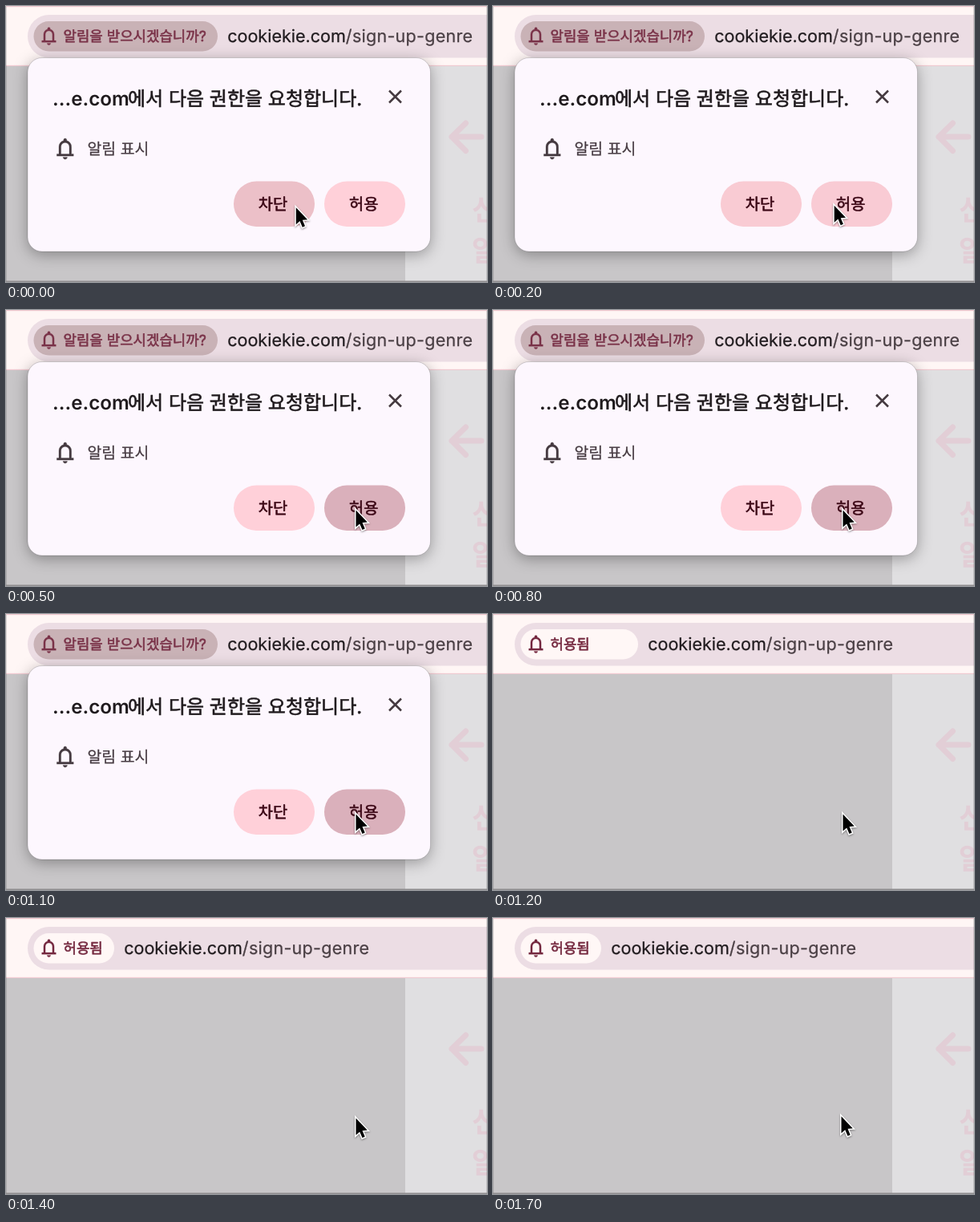
An HTML page for the animation above (1800 ms loop, 600 by 344 pixels).

```html
<!DOCTYPE html>
<html lang="ko">
<head>
<meta charset="utf-8">
<title>Notification permission</title>
<style>
  html, body { margin: 0; width: 100%; height: 100%; overflow: hidden; background: #c8c6c8; }
  svg { display: block; width: 100%; height: 100%; }
  text { font-family: Inter, "Noto Sans CJK KR", "Noto Sans CJK", sans-serif; text-rendering: geometricPrecision; white-space: pre; }
  /* A thin outline gives Hangul its medium weight */
  .ink { fill: currentColor; stroke: currentColor; stroke-width: .6; stroke-linejoin: round; }
  .thin { stroke-width: .25; }
  .popup { filter: drop-shadow(0 4px 9px rgba(0, 0, 0, .32)); }
  .arrow { filter: drop-shadow(0 1px 1.2px rgba(0, 0, 0, .4)); }
</style>
</head>
<body>
<svg viewBox="0 0 600 344" xmlns="http://www.w3.org/2000/svg">
  <defs>
    <path id="bell" transform="translate(-480 480)" stroke="currentColor" stroke-width="10" d="M160-200v-80h80v-280q0-83 50-147.5T420-792v-28q0-25 17.5-42.5T480-880q25 0 42.5 17.5T540-820v28q80 20 130 84.5T720-560v280h80v80H160ZM480-80q-33 0-56.5-23.5T400-160h160q0 33-23.5 56.5T480-80ZM320-280h320v-280q0-66-47-113t-113-47q-66 0-113 47t-47 113v280Z"/>
  </defs>

  <!-- page -->
  <rect width="600" height="344" fill="#c8c6c8"/>
  <rect x="498" y="74" width="102" height="270" fill="#e0dfe1"/>
  <path d="M593 163H556M573.5 146L556 163L573.5 180.5" fill="none" stroke="#e2ced6" stroke-width="7" stroke-linecap="round" stroke-linejoin="round"/>
  <g fill="#e2ced6" font-size="36" font-weight="700">
    <text x="581" y="267">신</text>
    <text x="581" y="318">알</text>
  </g>

  <!-- toolbar -->
  <rect width="600" height="74" fill="#fff6f5"/>
  <rect width="600" height="1.2" fill="#edc5cc"/>
  <rect y="73.800" width="600" height="1.200" fill="#efc9d0"/>
  <rect x="27" y="11" width="640" height="53.500" rx="26.750" fill="#ecdde4"/>
  <rect id="chip" x="34.500" y="19" height="37.500" rx="18.750"/>
  <g id="chipInk" fill="currentColor">
    <use href="#bell" transform="translate(53.500 37.600) scale(.0275)"/>
    <text id="chipText" class="ink" x="71.500" y="44.300" font-size="17.850"></text>
  </g>
  <g id="url" font-size="21.550">
    <text class="ink thin" y="45.400" color="#1f1a1d">cookiekie.com<tspan class="ink thin" color="#4a3f44" letter-spacing=".25">/sign-up-genre</tspan></text>
  </g>

  <!-- permission popup -->
  <g id="popup">
    <rect class="popup" x="27" y="64.500" width="502.500" height="241.500" rx="18" fill="#fdf7fe" stroke="#000" stroke-opacity=".25" stroke-width=".7"/>
    <g color="#1f1a1d">
      <text x="58" y="123.500" font-size="24.200" font-weight="600" fill="currentColor">...e.com</text>
      <text class="ink" x="152" y="123.500" font-size="24">에서 다음 권한을 요청합니다.</text>
    </g>
    <path d="M478 105.500L493 120.500M493 105.500L478 120.500" stroke="#453a40" stroke-width="2.500"/>
    <g color="#453a40" fill="currentColor">
      <use href="#bell" transform="translate(73.800 178) scale(.0325)"/>
      <text class="ink thin" x="101.500" y="184.900" font-size="19.400">알림 표시</text>
    </g>
    <g font-size="19.800" text-anchor="middle" color="#3b0715">
      <rect x="284" y="218.500" width="101" height="56.500" rx="28.250" fill="#ffd0d9"/>
      <rect id="block" x="284" y="218.500" width="101" height="56.500" rx="28.250" fill="#3c2828"/>
      <text class="ink" x="333" y="254.200">차단</text>
      <rect x="397" y="218.500" width="101" height="56.500" rx="28.250" fill="#ffd0d9"/>
      <rect id="allow" x="397" y="218.500" width="101" height="56.500" rx="28.250" fill="#3c283c"/>
      <text class="ink" x="446.200" y="254.200">허용</text>
    </g>
  </g>

  <!-- window edge -->
  <path d="M.5 1V343M599.5 1V343" stroke="#000" stroke-opacity=".13"/>
  <rect y="342.500" width="600" height="1.500" fill="#8f8d8f"/>

  <g id="cursor">
    <path class="arrow" d="M0 0V21L4.700 16.800L8 24.400L11.200 23L8 15.400L14.300 15Z" fill="#000" stroke="#fff" stroke-width="3" paint-order="stroke"/>
  </g>
</svg>
<script>
const LOOP = 1800, STEP = 100, CLOSE = 1200;
const $ = id => document.getElementById(id);

// Keys: [time, value...]
const cursorKeys = [[0, 361.8, 251.3], [100, 402, 250], [200, 425.7, 248.8], [300, 434, 249.2],
  [400, 436.5, 249.6], [1400, 436.5, 249.6], [1700, 434.5, 247.3]];
const blockKeys = [[0, .095], [100, .065], [200, .03], [300, 0]];
const allowKeys = [[0, 0], [100, 0], [200, .03], [300, .095], [400, .14], [500, .187]];
const chipKeys = [[1100, 264], [1200, 181], [1300, 142], [1400, 135]];

function at(keys, t) {
  const i = keys.findIndex(k => k[0] >= t);
  if (i < 0) return keys[keys.length - 1].slice(1);
  if (i === 0) return keys[0].slice(1);
  const a = keys[i - 1], b = keys[i], p = (t - a[0]) / (b[0] - a[0]);
  return a.slice(1).map((v, n) => v + (b[n + 1] - v) * p);
}

function draw(ms) {
  const t = Math.floor((ms % LOOP) / STEP) * STEP;
  const allowed = t >= CLOSE;
  const [right] = at(chipKeys, t);
  const [x, y] = at(cursorKeys, t);

  $("popup").style.display = allowed ? "none" : "";
  $("block").setAttribute("opacity", at(blockKeys, t)[0]);
  $("allow").setAttribute("opacity", at(allowKeys, t)[0]);
  $("chip").setAttribute("width", right - 34.5);
  $("chip").setAttribute("fill", allowed ? "#fff7f6" : "#c9b2b6");
  $("chipInk").setAttribute("color", allowed ? "#74283f" : "#7a3349");
  $("chipText").textContent = allowed ? "허용됨" : "알림을 받으시겠습니까?";
  $("url").setAttribute("transform", `translate(${right + 12.2} 0)`);
  $("cursor").setAttribute("transform", `translate(${x} ${y})`);
}

const start = performance.now();
function tick() {
  draw(performance.now() - start);
  requestAnimationFrame(tick);
}
draw(0);
requestAnimationFrame(tick);
</script>
</body>
</html>
```
